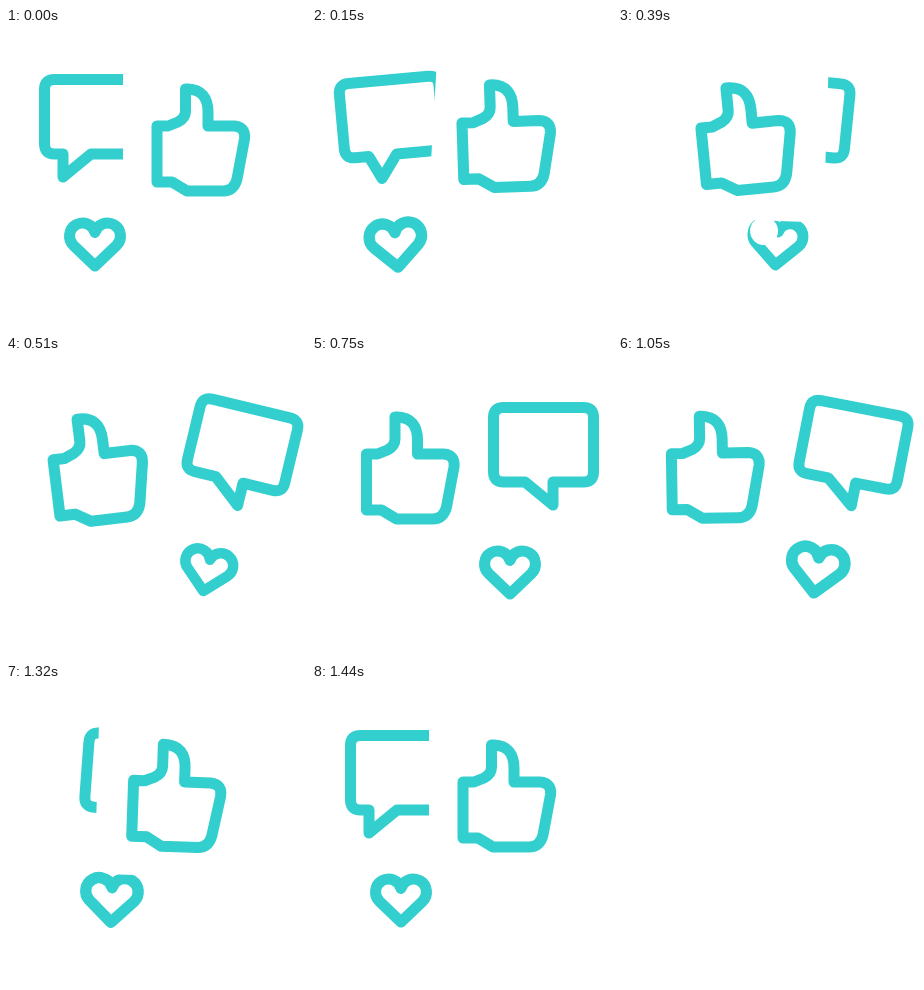
Recreate the animation shown at these times as an HTML page. Size 300 px wide and 300 px high, loop 1.5 s.

```html
<!DOCTYPE html>
<html lang="en">
<head>
<meta charset="utf-8">
<title>Reactions</title>
<style>
  html, body { margin: 0; width: 100%; height: 100%; overflow: hidden; background: #fff; }
  svg { display: block; width: 100vw; height: 100vh; }
  .line { fill: none; stroke: #32cfce; stroke-width: 11; stroke-linejoin: round; }
</style>
</head>
<body>
<svg viewBox="0 0 300 300">
  <path id="bubble" class="line"/>
  <path id="heart" class="line" d="M0 21L-21.7 .2A13 13 0 1 1 0 -12.6A13 13 0 1 1 21.7 .2Z"/>
  <g id="cover" fill="#fff">
    <rect x="-78" y="-81" width="156" height="160" rx="16"/>
    <circle cx="19" cy="89.5" r="14"/>
  </g>
  <g id="thumb">
    <path class="line" transform="translate(-195 -112.5)"
      d="M151 98H162L172 94Q179.500 90 179.500 83V61H182Q202 62 202 84V98H228Q240 99 238.500 111L231 151Q228 163 217 163H181L166 154H151Z"/>
  </g>
</svg>
<script>
const LOOP = 1500, STEP = 30;

const ease = {
  lin: p => p,
  in2: p => p * p,
  in3: p => p ** 3,
  out: p => 1 - (1 - p) ** 2,
  io: p => p < .5 ? 4 * p ** 3 : 1 - 4 * (1 - p) ** 3,
  sine: p => (1 - Math.cos(Math.PI * p)) / 2
};

// Rows: time, easing into the row, then x, y, angle, scale
const tracks = {
  bubble: [
    [30, 'lin', 88.5, 88.5, 0, 1], [240, 'sine', 74, 89, -8.5, 1],
    [510, 'io', 236.5, 88.5, 13.5, 1], [750, 'sine', 231.5, 88.5, 0, 1],
    [930, 'lin', 231.5, 88.5, 0, 1], [1050, 'sine', 235.5, 88.5, 11, 1],
    [1110, 'out', 237, 88.5, 13, 1], [1230, 'in3', 218, 89.5, 13, 1],
    [1440, 'out', 88.5, 88.5, 0, 1]
  ],
  heart: [
    [30, 'lin', 89, 217, 0, 1], [240, 'sine', 81, 218, -8, 1.05],
    [510, 'io', 201.5, 215.5, 12, .95], [750, 'sine', 198, 217, 0, 1],
    [930, 'lin', 198, 217, 0, 1], [1050, 'sine', 199, 215, 8, 1.05],
    [1230, 'in2', 140, 216, 6, 1.09], [1440, 'out', 89, 217, 0, 1]
  ],
  cover: [
    [30, 'lin', 195, 113, 0, 1], [240, 'sine', 200.5, 113, 5.5, 1],
    [510, 'io', 92, 113, 0, 1], [750, 'out', 98, 113, 0, 1],
    [930, 'lin', 98, 113, 0, 1], [1050, 'sine', 97, 113, 0, 1],
    [1230, 'in3', 115, 113.5, 5, 1], [1440, 'out', 195, 113, 0, 1]
  ],
  thumb: [
    [30, 'lin', 195, 112.5, 0, 1], [240, 'sine', 194.5, 105.5, -3, 1.01],
    [510, 'io', 93, 113, -7, 1.01], [750, 'out', 98.5, 112.5, 0, 1],
    [930, 'lin', 98.5, 112.5, 0, 1], [1080, 'sine', 97.5, 111.5, -1, 1],
    [1230, 'in3', 121.8, 112, 6, 1], [1440, 'out', 195, 112.5, 0, 1]
  ]
};

// 0: tail points left, 1: tail points right
const tailTrack = [
  [30, 'lin', 0], [240, 'lin', .7], [360, 'out', 1],
  [1050, 'lin', 1], [1230, 'in2', .48], [1440, 'out', 0]
];

function sample(rows, t) {
  const i = rows.findIndex(row => row[0] >= t);
  if (i < 0) return rows[rows.length - 1].slice(2);
  const to = rows[i];
  if (i === 0) return to.slice(2);
  const from = rows[i - 1];
  const p = ease[to[1]]((t - from[0]) / (to[0] - from[0]));
  return to.slice(2).map((v, k) => from[k + 2] + (v - from[k + 2]) * p);
}

function bubblePath(p) {
  const left = -31.5 + 13 * p, right = -3.5 + 13 * p, tip = -31.5 + 41 * p;
  return `M-40 -37H40Q50 -37 50 -27V27.5Q50 37.500 40 37.500H${right}` +
    `L${tip} 60.500L${left} 37.500H-40Q-50 37.500 -50 27.500V-27Q-50 -37 -40 -37Z`;
}

const nodes = Object.fromEntries(
  Object.keys(tracks).map(id => [id, document.getElementById(id)]));

function draw(t) {
  for (const id in tracks) {
    const [x, y, angle, scale] = sample(tracks[id], t);
    nodes[id].setAttribute('transform',
      `translate(${x} ${y}) rotate(${angle}) scale(${scale})`);
  }
  nodes.bubble.setAttribute('d', bubblePath(sample(tailTrack, t)[0]));
}

const start = performance.now();
function tick() {
  const t = (performance.now() - start) % LOOP;
  draw(Math.floor(t / STEP) * STEP);
  requestAnimationFrame(tick);
}
tick();
</script>
</body>
</html>
```
